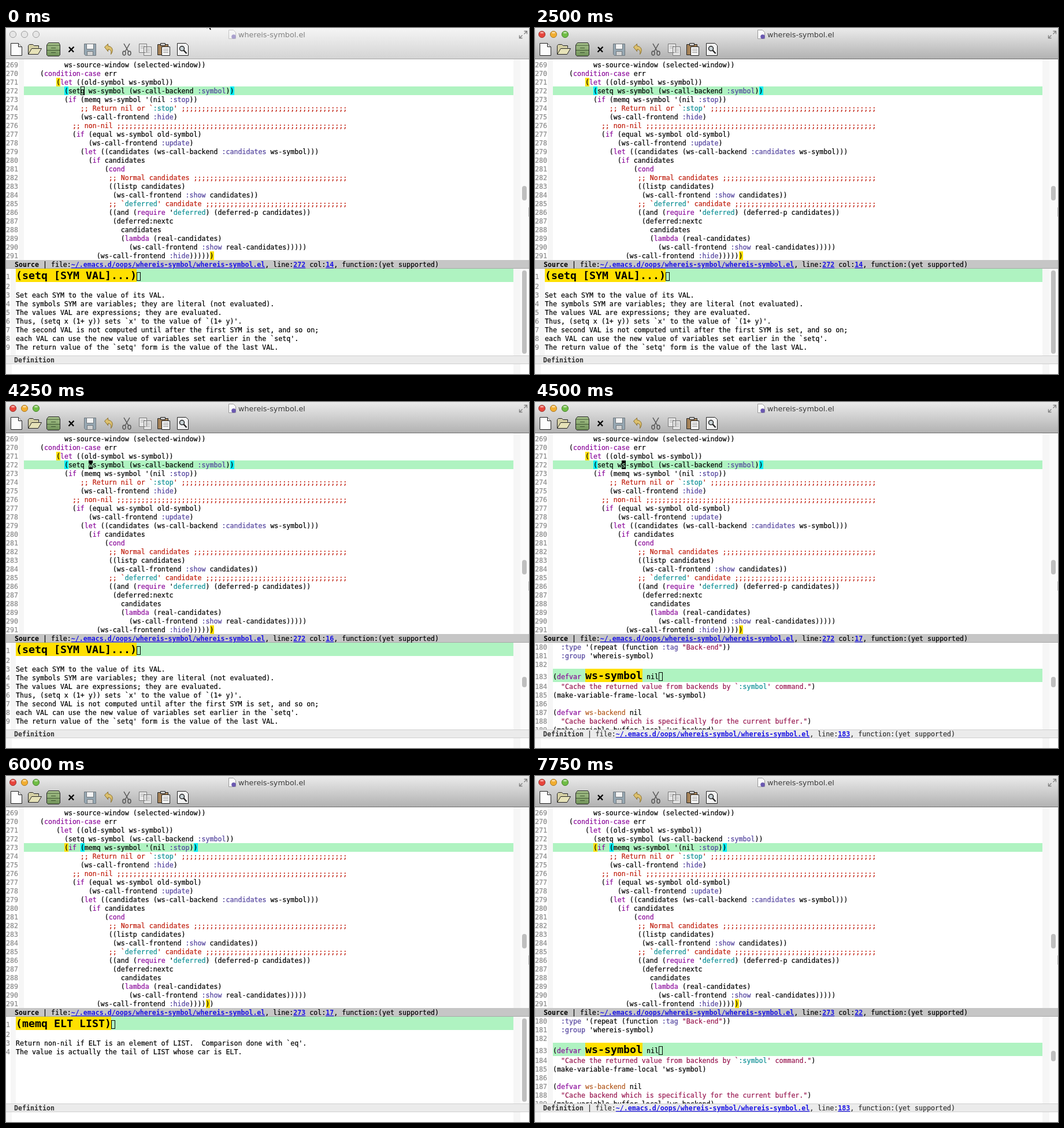
Write an HTML page that moves like this. It is 905 px wide and 598 px high and loops after 8000 ms.

```html
<!DOCTYPE html>
<html lang="en">
<head>
<meta charset="utf-8">
<title>whereis-symbol.el</title>
<style>
html, body { margin: 0; width: 100%; height: 100%; overflow: hidden; background: #fff; }
svg { display: block; }
text { white-space: pre; font: 11.628px "DejaVu Sans Mono", monospace; }
text, tspan { fill: currentColor; stroke: currentColor; stroke-width: .22; }
.big { font-size: 18.27px; font-weight: bold; stroke-width: 0; }
.b { font-weight: bold; stroke-width: 0; }
.link { font-weight: bold; color: #1a14e6; text-decoration: underline; stroke-width: 0; }
.key { color: #8b0a9b; }
.builtin { color: #50409c; }
.comment { color: #c01c0c; }
.const { color: #0b8f94; }
.string { color: #97164f; }
.name { color: #b35a1f; }
#title { font: 12.8px "DejaVu Sans", sans-serif; color: #3c3c3c; stroke-width: 0; }
#bar { fill: url(#active); }
#edge { fill: #6e6e6e; }
.idle #bar { fill: url(#inactive); }
.idle #edge { fill: #a4a4a4; }
.idle #title { color: #828282; }
.idle #lights circle { fill: #e6e6e6; stroke: #a0a0a0; }
.idle #lights ellipse { display: none; }
.idle #page { opacity: .5; }
</style>
</head>
<body>
<svg id="stage" width="905" height="598" viewBox="0 0 905 598">
  <defs>
    <linearGradient id="active" x2="0" y2="1"><stop stop-color="#ebebeb"/><stop offset="1" stop-color="#b2b2b2"/></linearGradient>
    <linearGradient id="inactive" x2="0" y2="1"><stop stop-color="#f5f5f5"/><stop offset="1" stop-color="#d4d4d4"/></linearGradient>
    <linearGradient id="drawer" x2="0" y2="1"><stop stop-color="#a9c48d"/><stop offset="1" stop-color="#6f9158"/></linearGradient>
  </defs>
  <g id="view"></g>

  <rect id="bar" width="905" height="53"/>
  <rect id="edge" y="53" width="905" height="1"/>
  <g id="lights">
    <circle cx="12" cy="11" r="5.6" fill="#e8453c" stroke="#9c3a34"/>
    <circle cx="32" cy="11" r="5.6" fill="#f2ae30" stroke="#a87a2c"/>
    <circle cx="52" cy="11" r="5.6" fill="#6fbd45" stroke="#4c8434"/>
    <g fill="#fff" opacity=".55"><ellipse cx="12" cy="8" rx="3" ry="1.6"/><ellipse cx="32" cy="8" rx="3" ry="1.6"/><ellipse cx="52" cy="8" rx="3" ry="1.6"/></g>
  </g>
  <g id="page">
    <path d="M385.5 3.5h8l4 4v11h-12z" fill="#fafafa" stroke="#999"/>
    <circle cx="394" cy="15" r="3.8" fill="#6a58b0"/>
  </g>
  <text id="title" x="402" y="16">whereis-symbol.el</text>
  <path d="M896.5 5.5h5v5m0-5l-5 5M893.5 17.5h-5v-5m0 5l5-5" fill="none" stroke="#808080" stroke-width="1.4"/>

  <g stroke="#222" stroke-linejoin="round">
    <path d="M8.5 26.5h13l6 6v15h-19z" fill="#fcfcfc"/>
    <path d="M21.5 26.5v6h6" fill="#ddd"/>
    <path d="M38.5 45.5v-15l2-2h6l2 2h8v4" fill="#d5d0a4"/>
    <path d="M38.5 45.5l6-10h17l-6 10z" fill="#e6e2b8"/>
    <path d="M70.5 29.5l3-4h18l2 4v17l-2 2h-19l-2-2z" fill="url(#drawer)"/>
    <path d="M71 30h22M71 38.5h22M78 34.5h8M78 42.5h8" stroke="#3f5733"/>
    <path d="M109 33l8 8.5M117.5 32.5l-9 9" stroke="#000" stroke-width="2.4" fill="none"/>
    <g stroke="#70777d">
      <path d="M135.5 27.5h20v20h-18l-2-2z" fill="#96a7b2"/>
      <path d="M139.5 27.5h12v9h-12z" fill="#f3f3f3"/>
      <path d="M140.5 40.5h10v7h-10z" fill="#d2d2d2"/>
    </g>
    <path d="M170.5 33l6-5.5v3.5c8 1 10 8 5 14.5 1-6 0-8-5-8.500v3.5z" fill="#dcc06e" stroke="#8a6f2c"/>
    <g fill="none" stroke="#555" stroke-width="1.5">
      <path d="M204 27l8 14M214 27l-8 14"/>
      <ellipse cx="204.5" cy="43.5" rx="2.5" ry="3.5"/><ellipse cx="213.5" cy="43.5" rx="2.5" ry="3.5"/>
    </g>
    <g stroke="#777" fill="#e6e6e6">
      <path d="M230.5 27.5h13v15h-13zM238.5 32.5h13v15h-13z"/>
      <path d="M233 31.5h8M233 34.5h5M241 36.5h8M241 39.5h8M241 42.5h8" stroke="#aaa"/>
    </g>
    <path d="M262.5 28.5h18v18h-18z" fill="#a58258"/>
    <path d="M267.5 26.5h8v4h-8z" fill="#ccc"/>
    <path d="M269.5 32.5h14v15h-14z" fill="#fafafa"/>
    <path d="M272 36.5h9M272 39.5h9M272 42.5h9" stroke="#888"/>
    <path d="M296.5 26.5h15l4 4v17h-19z" fill="#f2f2f2"/>
    <circle cx="304.5" cy="35.5" r="4" fill="#c9d3d6" stroke-width="1.5"/>
    <path d="M307.5 38.5l5 5.5" stroke-width="2.4"/>
  </g>
  <path id="mouse" d="M0 0V14.5l3.400-3.200 2.5 5.700 2.5-1.100-2.400-5.500h4.700z" fill="#000" stroke="#fff" stroke-width=".9"/>
</svg>

<script>
const LOOP = 8000, GREEN = '#aff3c1', YELLOW = '#ffe000', CYAN = '#00f0f8';
const FILE = '~/.emacs.d/oops/whereis-symbol/whereis-symbol.el';
const $ = id => document.getElementById(id);

const rule = (col, s) => (' '.repeat(col) + s + ' ').padEnd(80, ';');
const at = (col, s) => ' '.repeat(col) + s;
const code = [
  at(10, 'ws-source-window (selected-window))'),
  at(4, '(condition-case err'),
  at(8, '(let ((old-symbol ws-symbol))'),
  at(10, '(setq ws-symbol (ws-call-backend :symbol))'),
  at(10, "(if (memq ws-symbol '(nil :stop))"),
  rule(14, ";; Return nil or `:stop'"),
  at(14, '(ws-call-frontend :hide)'),
  rule(12, ';; non-nil'),
  at(12, '(if (equal ws-symbol old-symbol)'),
  at(16, '(ws-call-frontend :update)'),
  at(14, '(let ((candidates (ws-call-backend :candidates ws-symbol)))'),
  at(16, '(if candidates'),
  at(20, '(cond'),
  rule(21, ';; Normal candidates'),
  at(21, '((listp candidates)'),
  at(22, '(ws-call-frontend :show candidates))'),
  rule(21, ";; `deferred' candidate"),
  at(21, "((and (require 'deferred) (deferred-p candidates))"),
  at(22, '(deferred:nextc'),
  at(24, 'candidates'),
  at(24, '(lambda (real-candidates)'),
  at(26, '(ws-call-frontend :show real-candidates)))))'),
  at(18, '(ws-call-frontend :hide))))))')
];

const docs = {
  setq: ['(setq [SYM VAL]...)', '', 'Set each SYM to the value of its VAL.',
    'The symbols SYM are variables; they are literal (not evaluated).',
    'The values VAL are expressions; they are evaluated.',
    "Thus, (setq x (1+ y)) sets `x' to the value of `(1+ y)'.",
    'The second VAL is not computed until after the first SYM is set, and so on;',
    "each VAL can use the new value of variables set earlier in the `setq'.",
    "The return value of the `setq' form is the value of the last VAL."],
  memq: ['(memq ELT LIST)', '',
    "Return non-nil if ELT is an element of LIST.  Comparison done with `eq'.",
    'The value is actually the tail of LIST whose car is ELT.']
};

const definition = [
  `  :type '(repeat (function :tag "Back-end"))`,
  "  :group 'whereis-symbol)",
  '',
  '(defvar ',
  "  \"Cache the returned value from backends by `:symbol' command.\")",
  "(make-variable-frame-local 'ws-symbol)",
  '',
  '(defvar ws-backend nil',
  '  "Cache backend which is specifically for the current buffer.")',
  "(make-variable-buffer-local 'ws-backend)"
];

// [line, column, colour] of matching parentheses
const parens = {
  272: [[271, 8, YELLOW], [272, 10, CYAN], [272, 51, CYAN], [291, 46, YELLOW]],
  273: [[273, 10, YELLOW], [273, 14, CYAN], [273, 42, CYAN], [291, 45, YELLOW]]
};

const steps = [
  [0, { line: 272, col: 14, cursor: 'hollow', match: true, pane: 'setq', long: true, idle: true, mouse: [347, -13] }],
  [250, { mouse: [307, 10] }],
  [500, { mouse: [303, 13] }],
  [1250, { idle: false, cursor: 'solid' }],
  [1500, { cursor: '', mouse: [296, 11] }],
  [1750, { mouse: null }],
  [2000, { cursor: 'solid' }],
  [2500, { cursor: '' }],
  [3000, { cursor: 'solid' }],
  [3500, { col: 15, match: false }],
  [3750, { match: true }],
  [4000, { col: 16, match: false }],
  [4250, { match: true, long: false }],
  [4500, { col: 17, pane: 'definition' }],
  [5000, { cursor: '' }],
  [5500, { line: 273, cursor: 'solid', match: false }],
  [5750, { match: true, long: true }],
  [6000, { cursor: '', pane: 'memq' }],
  [6500, { cursor: 'solid', col: 18 }],
  [7000, { col: 20 }],
  [7250, { col: 22, match: false }],
  [7500, { match: true, long: false }],
  [7750, { cursor: '', pane: 'definition' }]
];

const rect = (x, y, w, h, fill, more = '') => `<rect x="${x}" y="${y}" width="${w}" height="${h}" fill="${fill}" ${more}/>`;
const text = (x, y, s, color = '#000', cls = '') => `<text x="${x}" y="${y}" color="${color}" class="${cls}">${s}</text>`;
const span = (cls, s) => `<tspan class="${cls}">${s}</tspan>`;
const hollow = (x, y, h) => rect(x + .5, y + .5, 6, h - 1, 'none', 'stroke="#000"');
const thumb = (y, h) => rect(893, y, 8, h, '#bfbfbf', 'rx="4"');
const number = (n, y) => text(0, y, n, '#8c8c8c');
const rowY = line => 101 + (line - 272) * 15;
const colX = col => 31 + col * 7;

const syntax = /(?<comment>;;.*)|(?<string>"[^"]*")|(?<key>(?<=\()(?:condition-case|let|if|cond|lambda|require|defvar)(?![\w-]))|(?<const>(?<=require ')deferred)|(?<name>(?<=defvar )ws-backend)|(?<builtin>(?<=[\s(]):[\w-]+)/g;
const paint = s => s.replace(syntax, (m, ...rest) => {
  const groups = rest.at(-1);
  const cls = Object.keys(groups).find(k => groups[k]);
  return span(cls, m.replace(/`([^']*)'/, (_, q) => '`' + span('const', q) + "'"));
});

function source(s) {
  let out = rect(22, 54, 9, 347, '#f6f6f6') + rect(31, rowY(s.line), 847, 15, GREEN);
  if (s.match) for (const [line, col, fill] of parens[s.line]) out += rect(colX(col), rowY(line), 7, 15, fill);
  code.forEach((row, i) => {
    const y = rowY(269 + i) + 12;
    out += number(269 + i, y) + text(31, y, paint(row));
  });
  const x = colX(s.col), y = rowY(s.line);
  if (s.cursor === 'hollow') out += hollow(x, y, 15);
  if (s.cursor === 'solid') out += rect(x, y, 7, 15, '#000') + text(x, y + 12, code[s.line - 269][s.col], GREEN);
  return out;
}

function docPane(rows) {
  const end = 17 + rows[0].length * 11;
  let out = rect(8, 416, 9, 150, '#f6f6f6') + rect(17, 416, 861, 23, GREEN) + rect(17, 416, end - 17, 23, YELLOW);
  rows.forEach((row, i) => {
    const y = i ? 436 + i * 15 : 434;
    out += number(i + 1, y) + text(17, y, row, '#000', i ? '' : 'big');
  });
  return out + hollow(end, 422, 15);
}

function definitionPane() {
  let out = rect(22, 416, 9, 150, '#f6f6f6') + rect(31, 461, 847, 23, GREEN) + rect(87, 461, 99, 23, YELLOW);
  definition.forEach((row, i) => {
    const y = 428 + i * 15 + (i > 2 ? 8 : 0) - (i === 3 ? 2 : 0);
    out += number(180 + i, y) + text(31, y, paint(row));
  });
  return out + text(87, 479, 'ws-symbol', '#000', 'big') + text(193, 479, 'nil') + hollow(214, 467, 15);
}

const status = (name, line, col) => span('b', name) + (line
  ? ` | file:${span('link', FILE)}, line:${span('link', line)}${col ? ' col:' + span('link', col) : ''}, function:(yet supported)`
  : '');

function render(s) {
  const isDef = s.pane === 'definition';
  $('view').innerHTML =
    rect(0, 54, 905, 544, '#fff') + rect(878, 54, 12, 544, '#f6f6f6') + rect(890, 54, 15, 512, '#fbfbfb') +
    source(s) +
    thumb(273, 25) + rect(904, 310, 1, 16, '#bbb') +
    (isDef ? definitionPane() : docPane(docs[s.pane])) +
    (s.long ? thumb(419, 144) : thumb(475, 18)) +
    rect(0, 401, 905, 15, '#c6c6c6') + rect(0, 415, 905, 1, '#a8a8a8') +
    text(15, 413, status('Source', s.line, s.col)) +
    rect(0, 566, 905, 15, '#ebebeb') + rect(0, 566, 905, 1, '#cfcfcf') + rect(0, 580, 905, 1, '#cfcfcf') +
    text(14, 578, status('Definition', isDef && 183), '#333') +
    rect(0, 581, 10, 17, '#f6f6f6');
  $('stage').classList.toggle('idle', s.idle);
  $('mouse').setAttribute('visibility', s.mouse ? 'visible' : 'hidden');
  if (s.mouse) $('mouse').setAttribute('transform', `translate(${s.mouse})`);
}

let shown = 0;
const start = performance.now();
function tick() {
  const now = Math.max(0, performance.now() - start) % LOOP;
  const past = steps.filter(([t]) => t <= now);
  if (past.length !== shown) {
    shown = past.length;
    render(Object.assign({}, ...past.map(([, change]) => change)));
  }
  requestAnimationFrame(tick);
}
tick();
</script>
</body>
</html>
```
